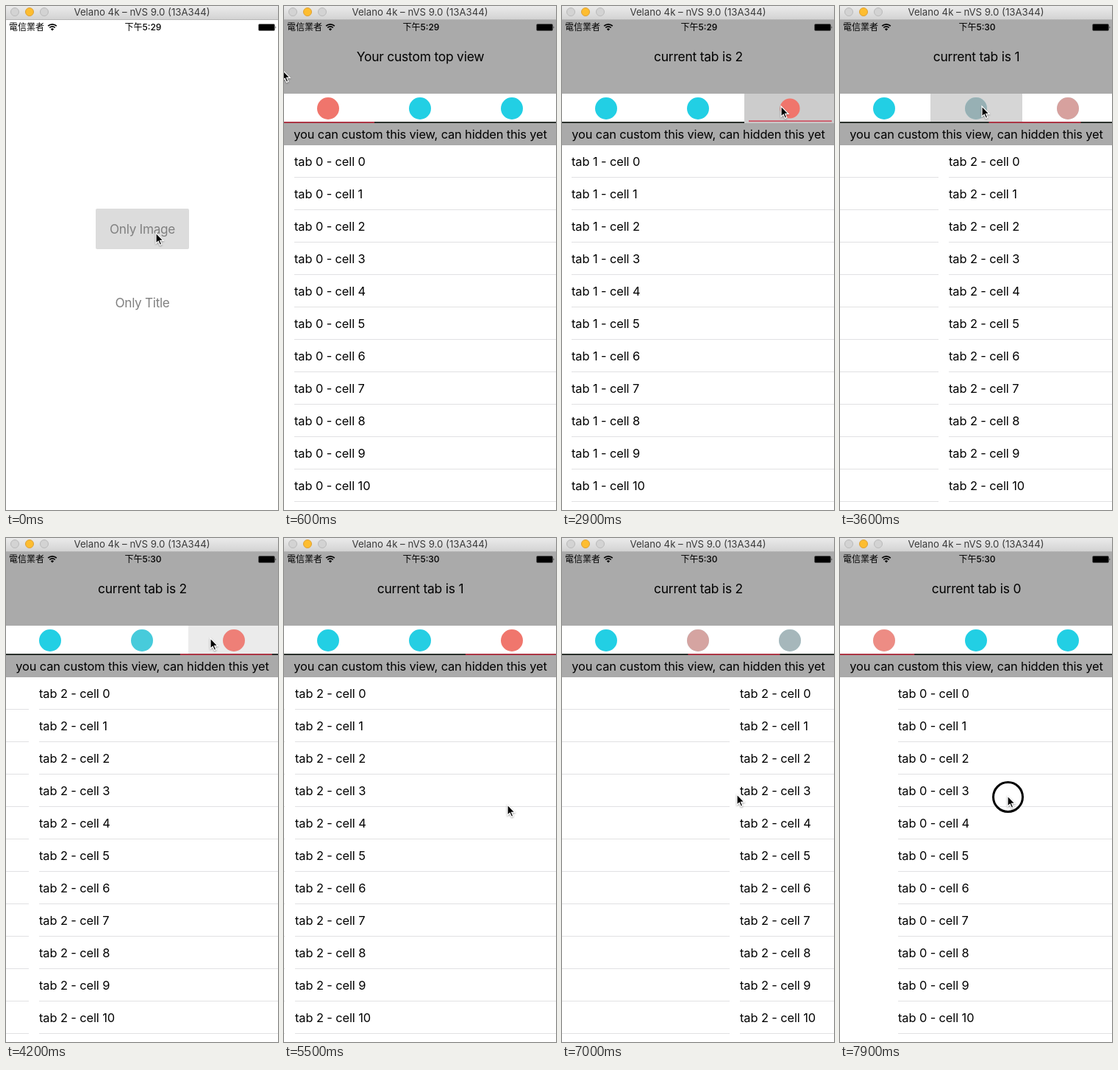
An HTML page that plays this animation: 370 by 684 pixels, repeating every 8 s.

```html
<!DOCTYPE html>
<html lang="zh-Hant">
<head>
<meta charset="utf-8">
<title>Tab page demo</title>
<style>
  html, body { margin: 0; width: 100%; height: 100%; overflow: hidden; background: #fff; }
  body { position: relative; font-family: Inter, "Open Sans", sans-serif; color: #000; }
  div, svg { position: absolute; box-sizing: border-box; white-space: nowrap; }
  #stage { left: 0; top: 0; width: 370px; height: 684px; overflow: hidden; background: #fff; }
  #phone { left: -2px; top: 0; width: 375px; height: 684px; }
  #home, #detail { left: 0; top: 18px; width: 375px; height: 666px; background: #fff; }
  #detail { overflow: hidden; }
  .button { left: 124px; width: 127px; height: 55px; border-radius: 2px; text-align: center;
    font-size: 17.2px; line-height: 56px; letter-spacing: -.3px; color: #808080; }
  .button.down { background: #dcdcdc; }
  #top { width: 375px; height: 101px; background: #aaa; text-align: center;
    line-height: 102px; font-size: 17.4px; letter-spacing: -.2px; }
  #tabs { top: 101px; width: 375px; height: 40px; background: #fff; }
  #line { top: 38px; width: 375px; height: 2px; background: #2a302c; }
  .shade { width: 125px; height: 38px; }
  .dot { top: 5px; width: 30px; height: 30px; }
  .dot div { width: 30px; height: 30px; border-radius: 50%; }
  .off { background: #22cfe4; }
  .on { background: #f0756c; }
  #bar { top: 38px; width: 125px; height: 2px; background: rgba(205, 55, 75, .8); }
  #hint { top: 141px; width: 375px; height: 30px; background: #aaa; text-align: center;
    font-size: 16.4px; line-height: 30px; letter-spacing: -.14px; }
  .list { top: 171px; width: 375px; height: 495px; }
  .row { left: 15px; width: 360px; height: 44px; border-bottom: 1px solid #e1e1e3;
    font-size: 16.4px; line-height: 44px; letter-spacing: -.1px; }
  #status { top: 18px; width: 370px; height: 22px; line-height: 22px; font-size: 12px;
    font-family: Inter, "Noto Sans CJK TC", "Noto Sans CJK", sans-serif; }
  #carrier { left: 4px; }
  #clock { width: 373px; text-align: center; font-weight: 500; }
  #window { width: 370px; height: 19px; border-bottom: 1px solid #b4b4b4; text-align: center;
    background: linear-gradient(#ebebeb, #d3d3d3); font-size: 13.2px; line-height: 17px; color: #3a3a3a; }
  .light { top: 2px; width: 12px; height: 12px; border-radius: 50%;
    background: #d3d3d3; border: 1px solid #bababa; }
  .light.lit { background: #fdbd30; border-color: #dda035; }
  #mouse { left: 0; top: 0; }
  #mouse svg { left: -2px; top: -2px; filter: drop-shadow(0 1px 1px rgba(0, 0, 0, .35)); }
  #ring { left: -21px; top: -20px; width: 43px; height: 43px; border: 3px solid #000; border-radius: 50%; }
</style>
</head>
<body>
<div id="stage">
  <div id="phone">
    <div id="home">
      <div class="button" id="imageButton" style="top:257px">Only Image</div>
      <div class="button" style="top:357px">Only Title</div>
    </div>
    <div id="detail">
      <div id="top"></div>
      <div id="tabs"><div id="line"></div></div>
      <div id="hint">you can custom this view, can hidden this yet</div>
    </div>
  </div>
  <div id="status">
    <div id="carrier">電信業者</div>
    <svg style="left:56px;top:5px" width="14" height="12" fill="none" stroke="#000" stroke-width="1.7">
      <path d="M1.2 4.2a8.2 8.2 0 0 1 11.6 0M3.3 6.5a5.2 5.2 0 0 1 7.4 0"/>
      <path d="M7 10.6L4.9 8.4a3 3 0 0 1 4.2 0z" fill="#000" stroke="none"/>
    </svg>
    <div id="clock"></div>
    <svg style="left:343px;top:6px" width="26" height="11">
      <rect x=".5" y=".5" width="22" height="9" rx="1.5" fill="none" stroke="#000" stroke-opacity=".5"/>
      <rect x="1" y="1" width="21" height="8" rx=".5"/>
      <path d="M23.6 3.2q1.6 1.8 0 3.6z"/>
    </svg>
  </div>
  <div id="window">
    <div class="light" style="left:6px"></div>
    <div class="light lit" style="left:26px"></div>
    <div class="light" style="left:46px"></div>
    Velano 4k – nVS 9.0 (13A344)
  </div>
  <div id="mouse">
    <div id="ring"></div>
    <svg width="16" height="22">
      <path d="M2 2v14.2l3.2-3 2.3 5.2 2.3-1-2.2-5h4.5z" stroke="#fff" stroke-width="1.2"/>
    </svg>
  </div>
</div>
<script>
const LOOP = 8000, STEP = 100, PAGE = 375, CELL = 125, ROWS = 11;
const TRAVEL = 400;                       // pointer's way to the next gesture
const DELAY = 100, SLIDE = 245;           // page change after a tap
const SWIPE = 530, REACH = 110, PULL = .23;
const HOLD = 150, FADE = 250, SHRINK = .904;
const $ = id => document.getElementById(id);

const rest = (at, x, y) => ({ kind: "rest", at, x, y });
const tap = (at, tab) => ({ kind: "tap", at, tab, x: 48 + tab * CELL, y: 136 });
const swipe = (at, tab, dir, x, y) => ({ kind: "swipe", at, tab, dir, x, y });
const pull = (at, tab, dir, x, y) => ({ kind: "pull", at, tab, dir, x, y });

const gestures = [
  rest(0, 204, 308), rest(600, -2, 87), rest(1400, 150, 480),
  tap(2000, 1), tap(2800, 2), tap(3400, 1), tap(3900, 2), tap(4500, 1),
  swipe(5000, 2, -1, 311, 365), pull(5700, 2, -1, 300, 358),
  swipe(6695, 1, 1, 181, 347), swipe(7225, 0, 1, 170, 350), pull(7755, 0, 1, 165, 350)
];

const clamp = v => Math.max(0, Math.min(1, v));
const ease = v => (v = clamp(v), v * v * (3 - 2 * v));
const mix = (a, b, f) => a + (b - a) * f;

// Page, title, pressed tab and pointer that follow from the gestures so far
function pose(t) {
  let page = 0, tab = 0, title = "Your custom top view", pressed = null, current;
  for (const g of gestures) {
    if (g.at > t) break;
    current = g;
    const since = t - g.at, f = clamp(since / SWIPE);
    if (g.kind === "rest") continue;
    if (g.kind === "tap") {
      page = mix(tab, g.tab, ease((since - DELAY) / SLIDE));
      pressed = g;
    }
    if (g.kind === "swipe") page = mix(tab, g.tab, ease(f));
    if (g.kind === "pull") page = g.tab - g.dir * PULL * Math.sin(Math.PI * f);
    if (g.kind !== "swipe" || f === 1) title = `current tab is ${g.tab}`;
    tab = g.tab;
  }
  const f = clamp((t - current.at) / SWIPE);
  const next = gestures[gestures.indexOf(current) + 1] || current;
  const go = next === current ? 0 : ease(1 - (next.at - t) / TRAVEL);
  const drag = (current.dir || 0) * REACH * Math.sin(Math.PI * f) ** 2;
  return {
    page, title, pressed,
    x: mix(current.x + drag, next.x, go),
    y: mix(current.y, next.y, go),
    pulling: current.kind === "pull" && f < 1
  };
}

function add(parent, cls, text = "") {
  const el = document.createElement("div");
  el.className = cls;
  el.textContent = text;
  return parent.appendChild(el);
}

const cells = [0, 1, 2].map(i => {
  const shade = add($("tabs"), "shade");
  shade.style.left = i * CELL + "px";
  const dot = add($("tabs"), "dot");
  dot.style.left = i * CELL + 47 + "px";
  const off = add(dot, "off"), on = add(dot, "on");
  const list = add($("detail"), "list");
  list.style.left = 1 - i + "px";
  for (let r = 0; r < ROWS; r++)
    add(list, "row", `tab ${i} - cell ${r}`).style.top = r * 44 + "px";
  return { shade, dot, off, on, list };
});
const bar = add($("tabs"), "");
bar.id = "bar";

function draw(t) {
  const push = PAGE * (1 - ease((t - 50) / 500));
  $("home").style.transform = `translateX(${(push - PAGE) * .3}px)`;
  $("detail").style.transform = `translateX(${push}px)`;
  $("imageButton").classList.toggle("down", t < 300);

  const { page, title, pressed, x, y, pulling } = pose(t);
  const since = pressed ? t - pressed.at : LOOP;
  const held = since < HOLD;
  const alpha = .2 * clamp(1 - (since - HOLD) / FADE);
  const pos = held ? pressed.tab : page;
  const scale = held ? SHRINK : 1;

  cells.forEach((c, i) => {
    const mine = pressed && pressed.tab === i;
    const level = Math.round(255 * (1 - alpha));
    c.shade.style.background = mine && alpha ? `rgb(${level},${level},${level})` : "none";
    c.shade.style.height = mine && held ? "40px" : "38px";
    c.dot.style.transform = `scale(${mine ? scale : 1})`;
    const lit = clamp(1 - Math.abs(pos - i));
    c.on.style.opacity = lit;
    c.off.style.opacity = 1 - lit;
    c.list.style.transform = `translateX(${Math.round((i - page) * PAGE)}px)`;
  });
  bar.style.transform = `translate(${pos * CELL}px, ${held ? -1.8 : 0}px) scale(${scale})`;

  $("top").textContent = title;
  $("clock").textContent = t < 3500 ? "下午5:29" : "下午5:30";
  $("mouse").style.transform = `translate(${Math.round(x)}px, ${Math.round(y)}px)`;
  $("ring").style.display = pulling ? "block" : "none";
}

const start = performance.now();
function tick(now) {
  const t = Math.max(0, now - start) % LOOP;
  draw(Math.floor(t / STEP) * STEP);
  requestAnimationFrame(tick);
}
draw(0);
requestAnimationFrame(tick);
</script>
</body>
</html>
```
